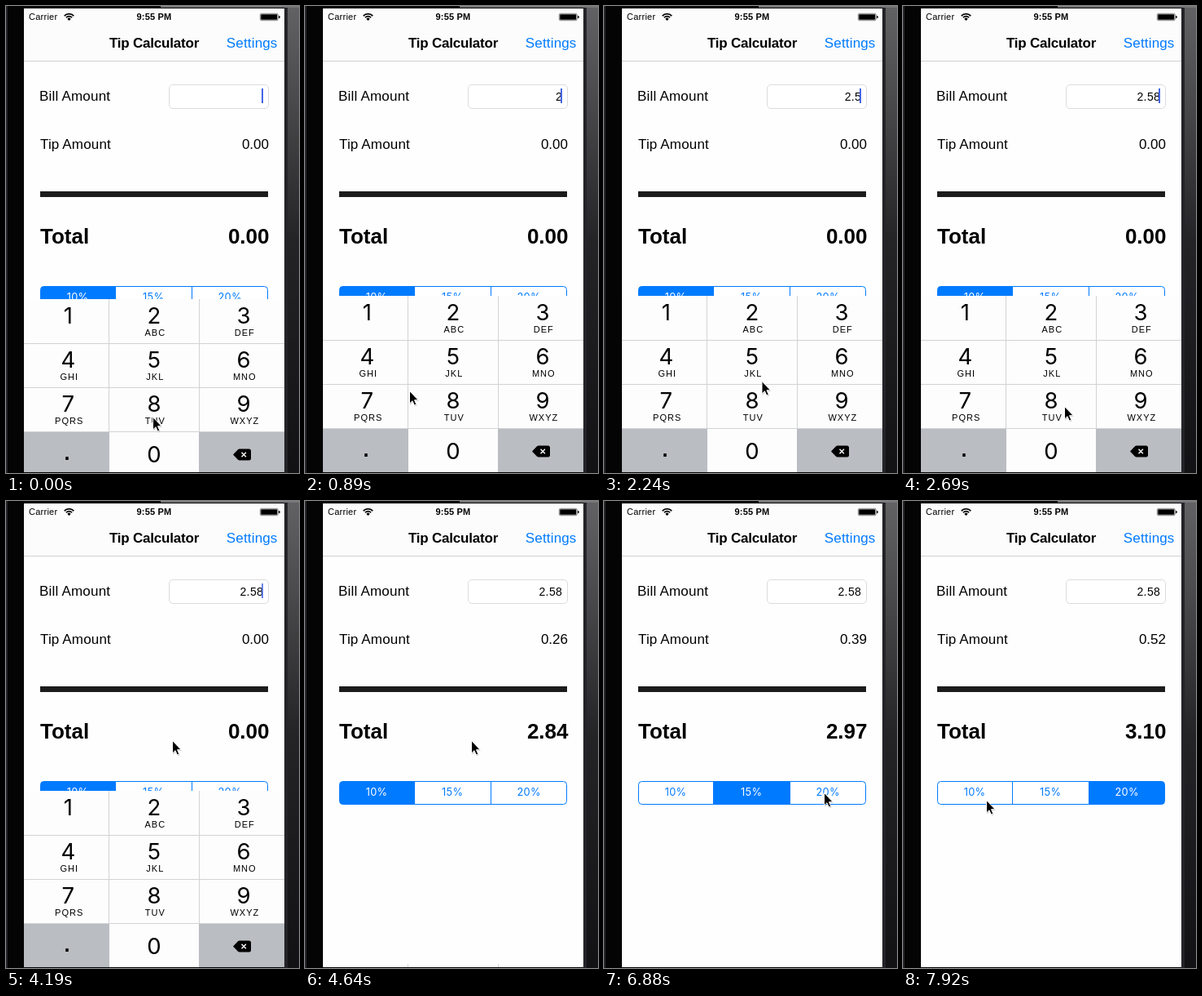
An HTML page for the animation above (8 s loop, 360 by 572 pixels).

```html
<!DOCTYPE html>
<html lang="en">
<head>
<meta charset="utf-8">
<title>Tip Calculator</title>
<style>
html, body { margin: 0; width: 100%; height: 100%; overflow: hidden; background: #000; }
svg { display: block; width: 100vw; height: 100vh; }
text { font-family: "Liberation Sans", Arial, sans-serif; fill: #000; white-space: pre; }
.b { font-weight: 700; }
.m { text-anchor: middle; }
.e { text-anchor: end; }
.num { font-family: Inter, "Liberation Sans", sans-serif; }
</style>
</head>
<body>
<svg viewBox="0 0 360 572">
  <defs>
    <linearGradient id="side" x1="0" y1="0" x2="0" y2="1">
      <stop offset="0" stop-color="#626264"/>
      <stop offset=".2" stop-color="#4a4a4c"/>
      <stop offset=".5" stop-color="#242427"/>
      <stop offset="1" stop-color="#121215"/>
    </linearGradient>
    <clipPath id="screen"><rect x="22" y="3" width="320" height="568"/></clipPath>
  </defs>

  <rect width="360" height="572" fill="#040405"/>
  <rect width="2" height="572" fill="#242429"/>
  <rect x="342" width="4" height="572" fill="#242428"/>
  <rect x="346" width="14" height="572" fill="url(#side)"/>
  <rect x="190" width="170" height="2" fill="#77777a"/>

  <g clip-path="url(#screen)">
    <rect x="22" y="2" width="320" height="569" fill="#fefefe"/>
    <rect x="22" y="2" width="320" height="65" fill="#fcfcfc"/>
    <rect x="22" y="67" width="320" height="1" fill="#d2d2d3"/>

    <text x="28" y="17" font-size="11" letter-spacing=".25">Carrier</text>
    <g fill="none" stroke="#000" stroke-width="1.7">
      <path d="M71.7 12.1A8 8 0 0 1 83.3 12.1M73.9 14.2A5 5 0 0 1 81.1 14.2"/>
      <path d="M77.5 18L75.3 15.7A3.1 3.1 0 0 1 79.7 15.7Z" fill="#000" stroke="none"/>
    </g>
    <text class="b m" x="182" y="17" font-size="11" letter-spacing=".2">9:55 PM</text>
    <rect x="312.3" y="9.3" width="21.9" height="8.4" rx="1.6" fill="none" stroke="#000" stroke-width=".5"/>
    <rect x="313.2" y="10.2" width="20.1" height="6.6" rx=".8"/>
    <path d="M335.2 11.7q1.6 .3 1.6 1.8t-1.6 1.8z"/>

    <text class="b m" x="182" y="51" font-size="17" letter-spacing="-.2">Tip Calculator</text>
    <text class="e" x="333.5" y="51" font-size="17" letter-spacing=".15" style="fill:#007aff">Settings</text>

    <text x="41" y="116" font-size="17" letter-spacing=".2">Bill Amount</text>
    <rect x="200.5" y="96.5" width="122" height="29" rx="4.5" fill="#fff" stroke="#dcdcdd"/>
    <text id="bill" class="e" x="316.3" y="116" font-size="14" letter-spacing=".4"></text>
    <rect id="caret" x="314" y="101" width="2" height="18" fill="#4566e6"/>
    <text x="42" y="175" font-size="17" letter-spacing=".15">Tip Amount</text>
    <text id="tip" class="e" x="323" y="175" font-size="17"></text>
    <rect x="42" y="227" width="280" height="7" fill="#1c1c1c"/>
    <text class="b" x="42" y="291.4" font-size="26">Total</text>
    <text id="total" class="b e" x="323.5" y="291.4" font-size="26"></text>

    <g id="segs"></g>
    <g id="pad"></g>
  </g>

  <g id="mouse">
    <path d="M1 2V17.5L4.7 14.2L7 19.3L9.6 18.2L7.3 13H12Z" fill="#000" opacity=".2"/>
    <path d="M.5 .5V16L4 12.7L6.3 18L8.8 16.9L6.5 11.7H11.2Z" stroke="#fff" stroke-width="1"/>
  </g>
</svg>
<script>
const $ = id => document.getElementById(id);

function add(parent, tag, attrs, content = "") {
  const node = document.createElementNS("http://www.w3.org/2000/svg", tag);
  for (const k in attrs) node.setAttribute(k, attrs[k]);
  node.textContent = content;
  return parent.appendChild(node);
}

const BLUE = "#007aff", GREY = "#babdc2", WHITE = "#fdfdfd", LINE = "#d2d3d5";
const LOOP = 8000, PAD_TOP = 355, ROW = 54;

// Segmented control
const edges = [42.5, 134.5, 228.5, 321.5];
const rates = [10, 15, 20];
const segs = rates.map((rate, i) => {
  const [a, b] = [edges[i], edges[i + 1]];
  const l = i === 0 ? 4 : 0, r = i === 2 ? 4 : 0;
  const box = add($("segs"), "path", {
    d: `M${a + l} 343.5H${b - r}q${r} 0 ${r} ${r}V${371.5 - r}q0 ${r} ${-r} ${r}` +
       `H${a + l}q${-l} 0 ${-l} ${-l}V${343.5 + l}q0 ${-l} ${l} ${-l}Z`,
    stroke: BLUE
  });
  const label = add($("segs"), "text",
    { class: "num m", x: [88, 181.2, 275.2][i], y: 361, "font-size": 12.8, "letter-spacing": .3 }, rate + "%");
  return { box, label };
});

// Number pad, drawn from its own top edge
const keys = {};
const cols = [22, 127, 237, 342], mids = [76.4, 182, 292];
const letters = ["", "ABC", "DEF", "GHI", "JKL", "MNO", "PQRS", "TUV", "WXYZ"];
[..."123456789.0<"].forEach((key, i) => {
  const c = i % 3, y = Math.floor(i / 3) * ROW, mid = mids[c];
  const rest = key === "." || key === "<" ? GREY : WHITE;
  const box = add($("pad"), "rect", { x: cols[c], y, width: cols[c + 1] - cols[c], height: ROW });
  keys[key] = { box, rest };
  if (key === "<") {
    add($("pad"), "path", { d: "M279 190.5L285 184.2Q285.7 183.5 287 183.5H298.5Q301 183.5 301 186V195Q301 197.5 298.5 197.5H287Q285.7 197.5 285 196.8Z" });
    add($("pad"), "path", { d: "M289.5 187.8l5.4 5.4m0 -5.4l-5.4 5.4", stroke: "#fff", "stroke-width": 1.4 });
  } else if (key === ".") {
    add($("pad"), "text", { class: "b m", x: 75, y: 197, "font-size": 25 }, key);
  } else {
    add($("pad"), "text", { class: "num m", x: mid, y: y + (i > 8 ? 37.5 : 29.6), "font-size": 27.5 }, key);
    add($("pad"), "text",
      { class: "m", x: mid + 1.3, y: y + 45, "font-size": 11, "letter-spacing": 1 }, letters[i] || "");
  }
});
for (const r of [1, 2, 3]) add($("pad"), "rect", { x: 22, y: r * ROW, width: 320, height: 1, fill: LINE });
for (const x of [126, 237]) add($("pad"), "rect", { x, y: 0, width: 1, height: 3 * ROW, fill: LINE });

// Timelines: [time, value...]
const presses = [["2", 590, 740], [".", 1190, 1340], ["5", 1940, 2090], ["8", 2390, 2540]];
const blink = [[0, 1], [290, .5], [440, 0], [590, 1], [3290, .4], [3440, 0], [3740, .5],
  [3890, 1], [4190, .8], [4340, 0]];
const picks = [[0, 0], [6290, 1], [7330, 2]];
const path = [
  [0, 180, 503], [140, 180, 500], [440, 184, 386], [590, 185, 378], [740, 170, 402],
  [1040, 86, 540], [1190, 82, 541], [1340, 83, 540], [1790, 191, 428], [2090, 192, 431],
  [2390, 195, 487], [2690, 198, 490], [3140, 197, 296], [3440, 200, 293], [3890, 204, 293],
  [5090, 204, 293], [5240, 204, 296], [5540, 200, 348], [5690, 193, 373], [5840, 189, 358],
  [6290, 190, 359], [6590, 226, 361], [6880, 270, 357], [7330, 269, 360], [7630, 203, 391],
  [7920, 102, 366]
];

const last = (list, t) => list.filter(p => p[0] <= t).pop()[1];

function mouseAt(t) {
  const i = path.findIndex(p => p[0] > t);
  if (i < 0) return path[path.length - 1].slice(1);
  const [a, b] = [path[i - 1], path[i]];
  const f = (t - a[0]) / (b[0] - a[0]);
  return [a[1] + (b[1] - a[1]) * f, a[2] + (b[2] - a[2]) * f];
}

function hold(t) {
  if (t < 140) return 0;
  if (t >= 7920) return 7920;
  const start = t < 6880 ? 140 : 6880;
  return start + Math.floor((t - start) / 150) * 150;
}

function padTop(t) {
  if (t < 140) return PAD_TOP + 4;
  const p = Math.min(1, Math.max(0, (t - 4300) / 400));
  return PAD_TOP + 217 * (1 - (1 - p) ** 2);
}

function draw(now) {
  const t = hold(now);
  const typed = presses.filter(p => p[2] <= t).map(p => p[0]).join("");
  const pick = last(picks, t);
  const bill = t < 4340 ? 0 : +typed;
  const tip = bill * rates[pick] / 100;

  $("bill").textContent = typed;
  $("tip").textContent = tip.toFixed(2);
  $("total").textContent = (bill + tip).toFixed(2);
  $("caret").setAttribute("opacity", last(blink, t));

  const touched = t === 6140 ? 1 : t === 7180 ? 2 : -1;
  segs.forEach(({ box, label }, i) => {
    box.setAttribute("fill", i === pick ? BLUE : i === touched ? "#d9ebff" : "#fff");
    label.style.fill = i === pick ? "#fff" : BLUE;
  });

  for (const k in keys) {
    const { box, rest } = keys[k];
    const down = presses.some(p => p[0] === k && t >= p[1] && t < p[2]);
    box.setAttribute("fill", !down ? rest : rest === GREY ? WHITE : GREY);
  }
  $("pad").setAttribute("transform", `translate(0 ${padTop(t)})`);
  $("mouse").setAttribute("transform", `translate(${mouseAt(t)})`);
}

const begin = performance.now();
function tick() {
  draw((performance.now() - begin) % LOOP);
  requestAnimationFrame(tick);
}
tick();
</script>
</body>
</html>
```
